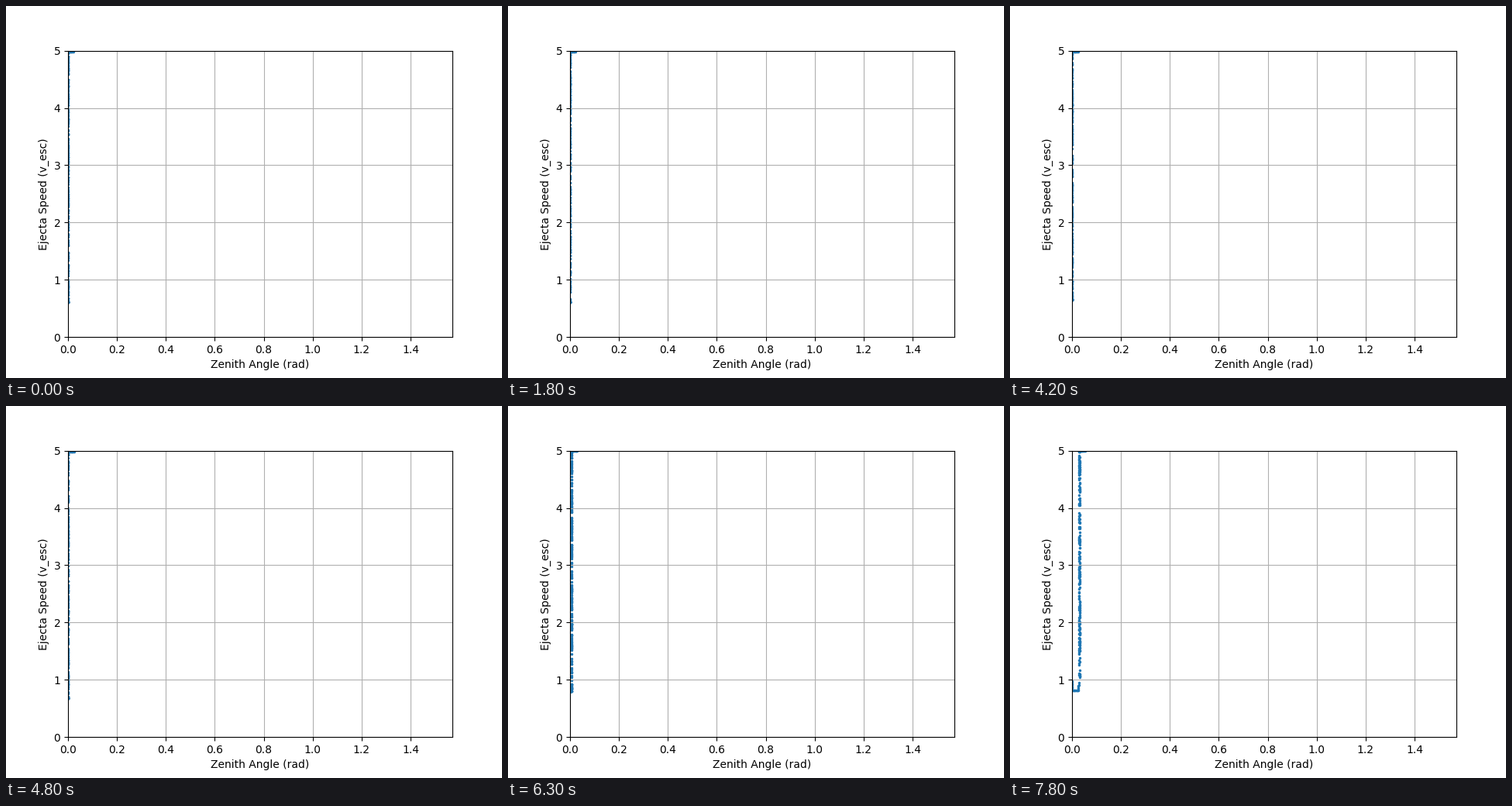
These frames come from a looping animation (640x480 px, 8 s). A matplotlib script:

```python
import numpy as np
import matplotlib.pyplot as plt
from matplotlib.animation import FuncAnimation

X_MAX, Y_MAX = np.pi / 2, 5
RAD_PER_PX = X_MAX / 496
TICK_MS, STEP_MS, LOOP_MS = 100, 300, 8000
LAST_STEP = (LOOP_MS - 1) // STEP_MS


def ramp(step, start):
    """Progress from 0 at the start step to 1 at the last step."""
    return np.clip((step - start) / (LAST_STEP - start), 0, 1)


def ejecta(step):
    """Points outlining the reachable region; angles are in pixels first."""
    rng = np.random.default_rng(step)
    progress = ramp(step, 0)
    drift = ramp(step, 18) ** 1.7
    dip = 0.245 * ramp(step, 23)

    wall = 0.3 + 9.2 * drift
    cap_end = 6.5 + 3.7 * progress**2 + 6.3 * drift**2
    cap = 4.98 + 0.02 * progress**2
    floor = 0.61 + 0.45 * progress**4 - dip

    # The wall leans left near its foot once it has moved away from the axis
    speed = np.append(rng.uniform(floor, cap, 220), floor)
    lean = 8 * dip
    angle = wall - lean * np.clip((1 - speed) / 0.19, 0, 1)
    angle += rng.uniform(-0.2, 0.2, speed.size)

    parts = [
        (angle, speed),
        (np.linspace(wall, cap_end, 10), np.full(10, cap)),
        (np.linspace(0.2, wall - lean, 10), np.full(10, floor)),
        (np.full(10, 0.2), np.linspace(floor, floor + 0.65 * dip, 10)),
    ]
    x, y = np.hstack(parts)
    return np.column_stack([x * RAD_PER_PX, y])


fig, ax = plt.subplots(figsize=(6.4, 4.8), dpi=100)
points = ax.scatter([], [], s=1, color="#1f77b4", linewidths=1.5)
ax.set(xlim=(0, X_MAX), ylim=(0, Y_MAX),
       xlabel="Zenith Angle (rad)", ylabel="Ejecta Speed (v_esc)")
ax.grid(True)


def update(frame):
    points.set_offsets(ejecta(frame * TICK_MS // STEP_MS))
    return (points,)


anim = FuncAnimation(fig, update, frames=LOOP_MS // TICK_MS,
                     interval=TICK_MS, repeat=True, repeat_delay=0)
plt.show()
```
